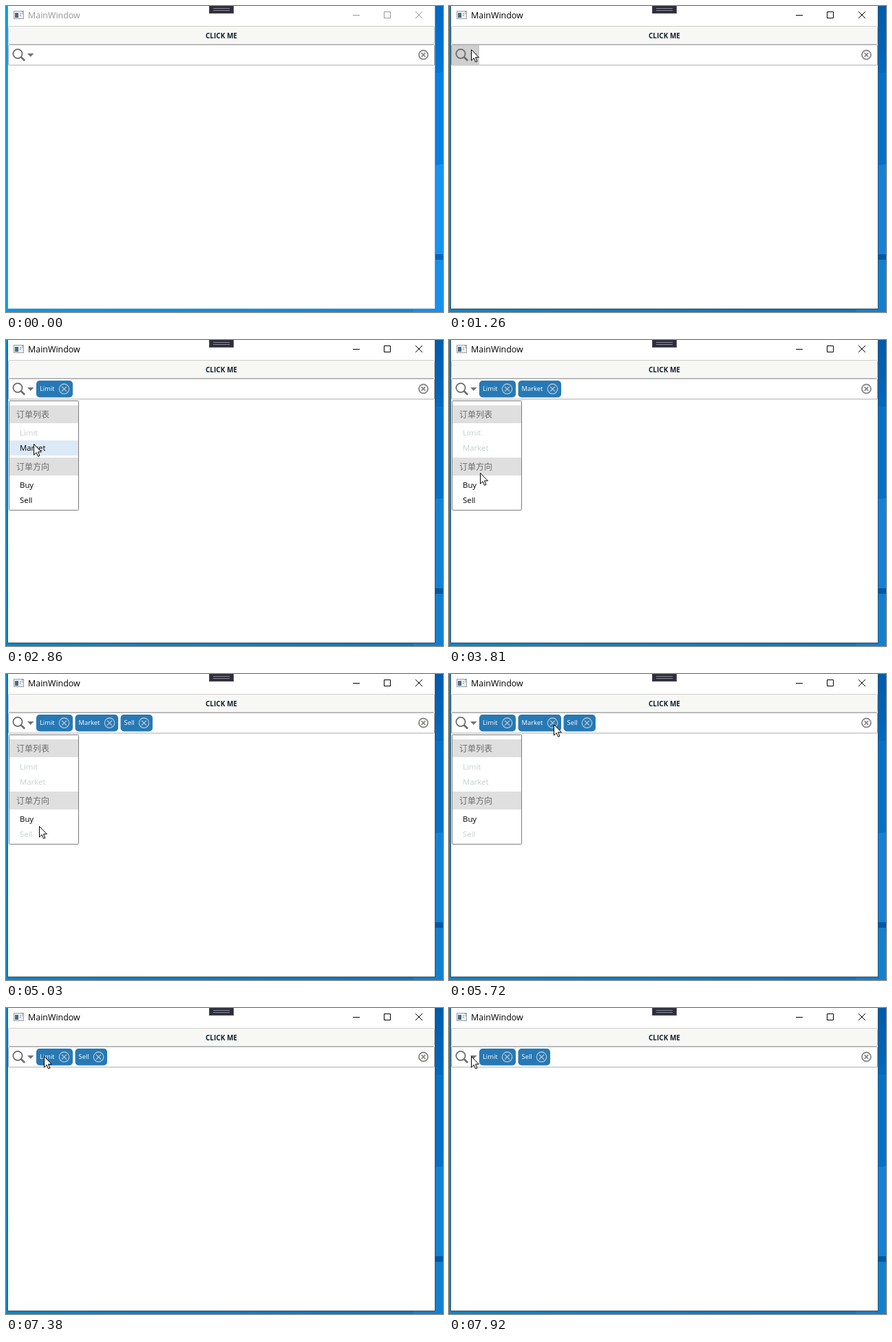
An HTML page for the animation above (7.99 s loop, 635x445 px).

```html
<!DOCTYPE html>
<html lang="zh-CN">
<head>
<meta charset="utf-8">
<title>MainWindow</title>
<style>
  html, body { margin: 0; width: 100%; height: 100%; overflow: hidden; }
  svg { display: block; width: 635px; height: 445px; font-family: "Open Sans", "Noto Sans", sans-serif; }
  .cjk { font: 12px "Noto Sans CJK SC", "Noto Sans CJK", sans-serif; fill: #6c6c6c; }
  .item { font-size: 11.4px; }
  .tag text { font-size: 9.4px; fill: #fff; }
  .line { fill: none; }
</style>
</head>
<body>
<svg viewBox="0 0 635 445">
  <defs>
    <linearGradient id="sky" x2="0" y2="1">
      <stop offset="0" stop-color="#0068c4"/><stop offset="1" stop-color="#0078dc"/>
    </linearGradient>
    <linearGradient id="floor">
      <stop offset="0" stop-color="#0b98e2"/><stop offset="1" stop-color="#0e86dc"/>
    </linearGradient>
  </defs>

  <g id="wallpaper">
    <rect width="635" height="445" fill="url(#floor)"/>
    <rect x="620" width="15" height="97" fill="url(#sky)"/>
    <path d="M620 96l15 2v133h-15z" fill="#0580e6"/>
    <path d="M620 232l15-2v131h-15z" fill="#1594f4"/>
    <rect x="620" y="361" width="15" height="8" fill="#0064b8"/>
    <path d="M620 369h15v76h-43v-5h28z" fill="#1590ee"/>
  </g>
  <rect id="shadow" width="635" height="445" opacity=".12"/>

  <rect id="frame" x="2" y="-2" width="622" height="443"/>
  <rect x="3" width="620" height="440" fill="#fff"/>

  <g id="appIcon">
    <rect x="11.5" y="7.5" width="14" height="11" fill="#eceef0" stroke="#9a9fa4"/>
    <rect x="13" y="10" width="5" height="7" fill="#4c6c84"/>
    <path d="M20 11h1.500M20 13.500h1.500M23 11h1.500M23 8.500h1.500" stroke="#6a7a88"/>
  </g>
  <g id="chrome">
    <text x="32" y="18" font-size="12.450" stroke="none">MainWindow</text>
    <path class="line" d="M504 13.500h10M549.500 8.500h9v9h-9zM595 8l10 10M605 8l-10 10"/>
  </g>
  <rect x="295.500" y="-1" width="35" height="11.500" fill="#2d2d3b" stroke="#54545e"/>
  <path d="M301 3.500h24M301 6.500h24" stroke="#8b8b98"/>

  <rect x="3.500" y="29.500" width="619" height="26" rx="2" fill="#f7f7f5" stroke="#cccccc"/>
  <text x="313" y="47" font-size="10" font-weight="700" text-anchor="middle" fill="#10202c">CLICK ME</text>

  <rect x="3.500" y="56.500" width="619" height="29.500" rx="1" fill="#fff" stroke="#a9a9a9"/>
  <rect id="press" x="4" y="57" width="40" height="29" fill="#cfcfcf"/>
  <circle class="line" cx="17" cy="69.500" r="6.600" stroke="#6c6c6c" stroke-width="1.800"/>
  <path d="M21.800 74.300l5.400 5.200" stroke="#6c6c6c" stroke-width="2.600"/>
  <path d="M31 69h9.500l-4.750 5z" fill="#747474"/>
  <g class="line" stroke="#8a8a88" stroke-width="1.900">
    <circle cx="606.500" cy="71" r="6.500"/>
    <path d="M603.700 68.200l5.600 5.600M609.300 68.200l-5.600 5.600"/>
  </g>
  <g id="tags"></g>

  <g id="popup">
    <rect x="4.500" y="88.500" width="101" height="159" rx="1" fill="#fff" stroke="#7c7c7c"/>
    <path d="M5 95h100v26H5zM5 171h100v26H5z" fill="#dfdfdf"/>
    <text class="cjk" x="15" y="112.500">订单列表</text>
    <text class="cjk" x="15" y="188.500">订单方向</text>
    <rect id="hover" x="5" width="100" height="22" fill="#dce9f7"/>
    <g id="items"></g>
  </g>

  <path id="cursor" d="M.5 .5v15.700l3.600-3.500 2.500 5.600 2.300-1-2.400-5.500h4.900z" fill="#fff" stroke="#000"/>
</svg>

<script>
const LOOP = 7990;
const $ = id => document.getElementById(id);
const set = (el, attrs) => { for (const k in attrs) el.setAttribute(k, attrs[k]); };
const show = (el, on) => set(el, { visibility: on ? 'visible' : 'hidden' });
const ramp = (t, a, b) => Math.min(1, Math.max(0, (t - a) / (b - a)));
const svg = markup => {
  const g = document.createElementNS('http://www.w3.org/2000/svg', 'g');
  g.innerHTML = markup;
  return g;
};

// Menu rows, with the time each one is picked
const rows = [
  { name: 'Limit', y: 124, picked: 2280 },
  { name: 'Market', y: 146, picked: 3360 },
  { name: 'Buy', y: 200, picked: Infinity },
  { name: 'Sell', y: 222, picked: 4640 }
];
for (const row of rows) {
  row.el = $('items').appendChild(svg(`<text class="item" x="20" y="${row.y + 15}">${row.name}</text>`));
}

const tags = [
  { name: 'Limit', width: 53, from: 2280, to: LOOP },
  { name: 'Market', width: 62.5, from: 3360, to: 6190 },
  { name: 'Sell', width: 46.5, from: 4640, to: LOOP }
];
for (const tag of tags) {
  const cx = tag.width - 12.5;
  tag.el = $('tags').appendChild(svg(`<g class="tag">
    <rect y="59" width="${tag.width}" height="24.5" rx="5" fill="#2779b5"/>
    <text x="5" y="74">${tag.name}</text>
    <g class="line" stroke="#b4c6d4" stroke-width="1.3"><circle cx="${cx}" cy="71.2" r="7.2"/>
    <path d="M${cx - 3.5} 67.7l7 7M${cx + 3.5} 67.7l-7 7"/></g></g>`));
}

// Pointer moves: first step, last step, number of steps, destination, easing
const linear = p => p;
const easeOut = p => Math.sin(p * Math.PI / 2);
const start = [576, 452];
const moves = [
  [120, 330, 4, 184, 219, linear],
  [520, 920, 7, 32, 63, easeOut],
  [1730, 2070, 6, 40, 136, easeOut],
  [2730, 3080, 6, 40, 157, easeOut],
  [3560, 3810, 4, 45, 193, linear],
  [3880, 4090, 4, 45, 222, easeOut],
  [4160, 4160, 1, 45, 224, linear],
  [4430, 4500, 2, 45, 225, linear],
  [5030, 5030, 1, 48, 221, linear],
  [5100, 5720, 10, 152, 73, easeOut],
  [5850, 5850, 1, 152, 71, linear],
  [6050, 6050, 1, 152, 70, linear],
  [7240, 7520, 5, 32, 70, easeOut]
];

function pointer(t) {
  let [x, y] = start;
  for (const [a, b, n, toX, toY, ease] of moves) {
    if (t < a) break;
    const step = n > 1 ? Math.min(n - 1, Math.floor((t - a) / (b - a) * (n - 1) + .2)) : 0;
    const p = ease((step + 1) / n);
    x += (toX - x) * p;
    y += (toY - y) * p;
  }
  return [Math.round(x), Math.round(y)];
}

function render(t) {
  const active = t >= 1120;
  const ink = active ? '#000' : '#969696';
  set($('chrome'), { fill: ink, stroke: ink });
  set($('frame'), { fill: active ? '#34566c' : '#4a9ac8' });
  show($('shadow'), active);

  const [x, y] = pointer(t);
  show($('cursor'), t >= 120);
  set($('cursor'), { transform: `translate(${x} ${y})` });

  const pressed = ramp(t, 780, 920) - ramp(t, 1380, 1530) + ramp(t, 7380, 7520) - ramp(t, 7700, 7920);
  set($('press'), { opacity: pressed });

  const opened = ramp(t, 1330, 1530) - ramp(t, 6030, 6260);
  set($('popup'), { opacity: opened });

  const hovered = opened > 0 && x >= 5 && x < 105 &&
    rows.find(r => t < r.picked && y >= r.y - 1 && y < r.y + 21);
  show($('hover'), hovered);
  if (hovered) set($('hover'), { y: hovered.y });
  for (const row of rows) set(row.el, { fill: t < row.picked ? '#000' : '#c8d0d0' });

  let left = 44;
  for (const tag of tags) {
    const on = t >= tag.from && t < tag.to;
    show(tag.el, on);
    if (!on) continue;
    set(tag.el, { transform: `translate(${left} 0)` });
    left += tag.width + 3.5;
  }
}

const origin = performance.now();
function tick() {
  render((performance.now() - origin) % LOOP);
  requestAnimationFrame(tick);
}
tick();
</script>
</body>
</html>
```
